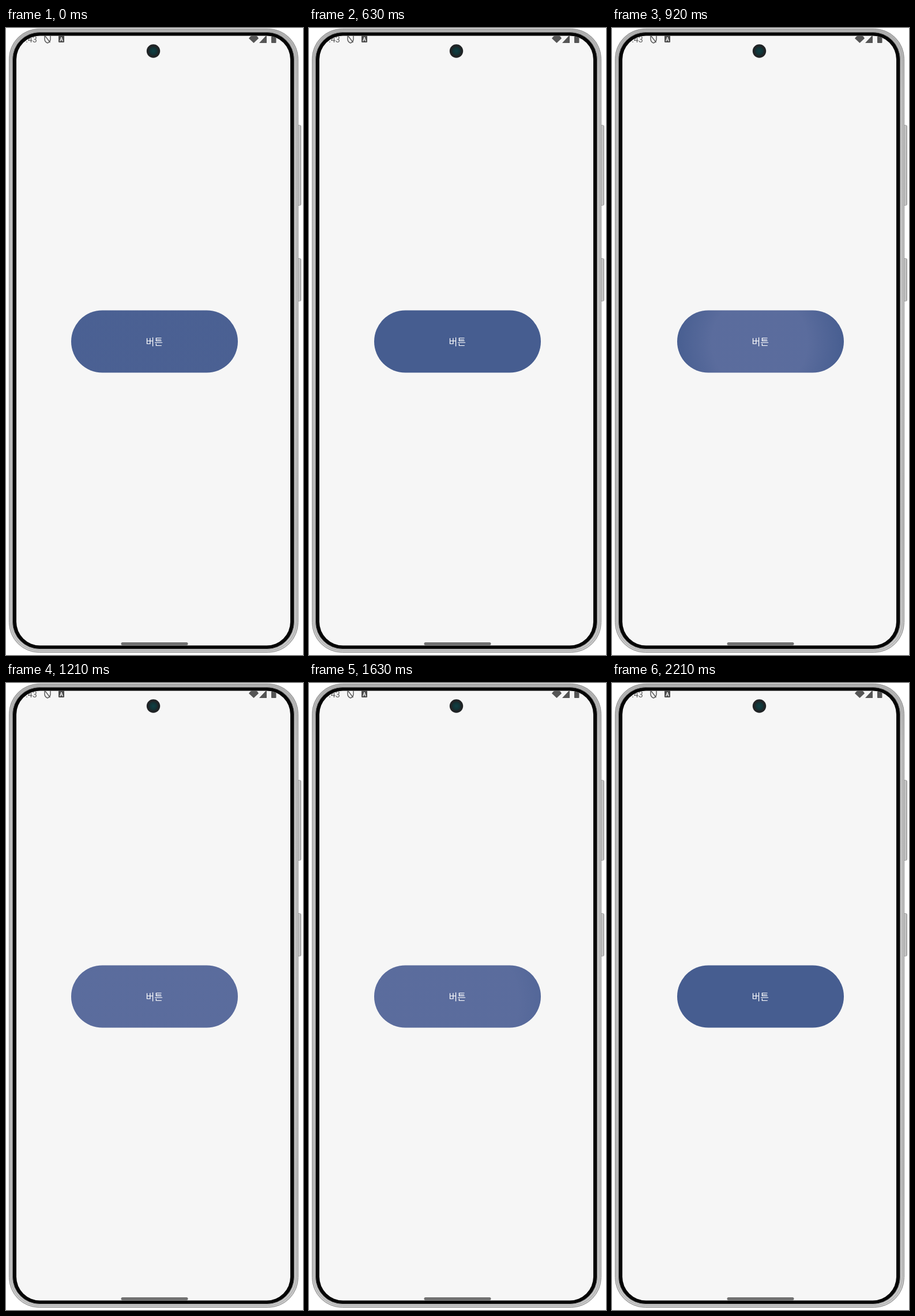
Recreate the animation shown at these times as an HTML page. Size 515 px wide and 1087 px high, loop 2.29 s.

```html
<!DOCTYPE html>
<html lang="ko">
<head>
<meta charset="utf-8">
<title>Button ripple</title>
<style>
  html, body { margin: 0; width: 100%; height: 100%; overflow: hidden; background: #fff; }
  svg { display: block; width: 515px; height: 1087px; }
  .clock { font: 14.5px Roboto, Arial, sans-serif; fill: #5c5c5c; }
  .badge { font: bold 9px Roboto, Arial, sans-serif; fill: #f6f6f6; }
  .label { font: 16px "Noto Sans CJK KR", "Noto Sans CJK", sans-serif; fill: #fff; }
  .ripple { opacity: 0; }
</style>
</head>
<body>
<svg viewBox="0 0 515 1087">
  <defs>
    <linearGradient id="metal" x1="0" y1="0" x2="0" y2="1">
      <stop offset="0" stop-color="#b0b0b0"/>
      <stop offset=".1" stop-color="#c3c3c3"/>
      <stop offset=".5" stop-color="#c9c9c9"/>
      <stop offset=".8" stop-color="#bcbcbc"/>
      <stop offset="1" stop-color="#cacaca"/>
    </linearGradient>
    <linearGradient id="key" x1="0" y1="0" x2="1" y2="0">
      <stop offset="0" stop-color="#aaa"/>
      <stop offset=".5" stop-color="#d2d2d2"/>
      <stop offset="1" stop-color="#a6a6a6"/>
    </linearGradient>
    <radialGradient id="glow">
      <stop offset=".55" stop-color="#f6deff"/>
      <stop offset="1" stop-color="#f6deff" stop-opacity="0"/>
    </radialGradient>
    <radialGradient id="lens">
      <stop offset="0" stop-color="#0f4044"/>
      <stop offset="1" stop-color="#142e31"/>
    </radialGradient>
    <clipPath id="screen"><rect x="18" y="13.5" width="475" height="1057" rx="41"/></clipPath>
    <clipPath id="pill"><rect x="113" y="489.5" width="289" height="108" rx="54"/></clipPath>
  </defs>

  <!-- body -->
  <g fill="url(#key)" stroke="#9a9a9a" stroke-width=".8">
    <rect x="503" y="168.5" width="8.6" height="139" rx="2.5"/>
    <rect x="503" y="399.5" width="8.6" height="74" rx="2.5"/>
  </g>
  <rect x="5.5" y="1.5" width="501" height="1081" rx="52" fill="url(#metal)" stroke="#8c8c8c"/>
  <rect x="8.5" y="4.5" width="495" height="1075" rx="50" fill="none" stroke="#a8a8a8"/>
  <rect x="11.5" y="7.5" width="488" height="1069" rx="47" fill="#050505" stroke="#6b6b6b"/>

  <g clip-path="url(#screen)">
    <rect x="18" y="13" width="475" height="1058" fill="#f6f6f6"/>
    <!-- status bar -->
    <text class="clock" x="54" y="25" text-anchor="end">:43</text>
    <g fill="none" stroke="#5c5c5c" stroke-width="1.5">
      <path d="M67 13V19Q67 24 72 26Q77 24 77 19V13"/>
      <path d="M67.5 13.5L76.5 25"/>
    </g>
    <rect x="91" y="11" width="10" height="14" rx="1.2" fill="#4d4d4d"/>
    <text class="badge" x="96" y="22.5" text-anchor="middle">A</text>
    <g fill="#555">
      <path d="M421 18Q424 13 430 12Q436 13 438 18L429.5 26Z"/>
      <path d="M439 26L452 12V26Z"/>
      <rect x="460" y="11" width="8.5" height="15" rx="1"/>
    </g>

    <rect x="199.5" y="1065" width="116" height="5" rx="2.5" fill="#707070"/>
  </g>

  <circle cx="255.5" cy="40" r="11.7" fill="#202426"/>
  <circle cx="255.5" cy="40" r="7.5" fill="url(#lens)"/>

  <!-- button -->
  <g clip-path="url(#pill)">
    <rect x="113" y="489" width="289" height="109" fill="#465d90"/>
    <g id="ripples"></g>
  </g>
  <text class="label" x="257.2" y="550.3" text-anchor="middle">버튼</text>
</svg>
<script>
  const LOOP = 2290, ENTER = 450, EXIT = 375, FADE_IN = 75;
  const MAX_R = 285, GLOW = 0.117;

  // Tap times and places; the first tap is already fading when the loop begins.
  const taps = [
    { at: -740, x: 257, y: 543 },
    { at: 758, x: 256, y: 545 },
    { at: 1358, x: 225, y: 555 }
  ];

  const clamp = v => Math.min(1, Math.max(0, v));

  // cubic-bezier(.4, 0, .2, 1)
  function ease(t) {
    let lo = 0, hi = 1;
    for (let i = 0; i < 20; i++) {
      const s = (lo + hi) / 2, q = 1 - s;
      if (1.2 * q * q * s + 0.6 * q * s * s + s ** 3 < t) lo = s; else hi = s;
    }
    return 3 * (1 - lo) * lo * lo + lo ** 3;
  }

  const layer = document.getElementById('ripples');
  const ripples = taps.map(tap => {
    const dot = document.createElementNS('http://www.w3.org/2000/svg', 'circle');
    dot.setAttribute('class', 'ripple');
    dot.setAttribute('cx', tap.x);
    dot.setAttribute('cy', tap.y);
    dot.setAttribute('fill', 'url(#glow)');
    layer.append(dot);
    return { dot, at: tap.at };
  });

  function draw(time) {
    for (const { dot, at } of ripples) {
      const age = time - at;
      const alpha = clamp(age / FADE_IN) * (1 - clamp((age - ENTER) / EXIT));
      dot.setAttribute('r', MAX_R * ease(clamp(age / ENTER)));
      dot.style.opacity = GLOW * alpha;
    }
  }

  const start = performance.now();
  function tick() {
    draw((performance.now() - start) % LOOP);
    requestAnimationFrame(tick);
  }
  tick();
</script>
</body>
</html>
```
